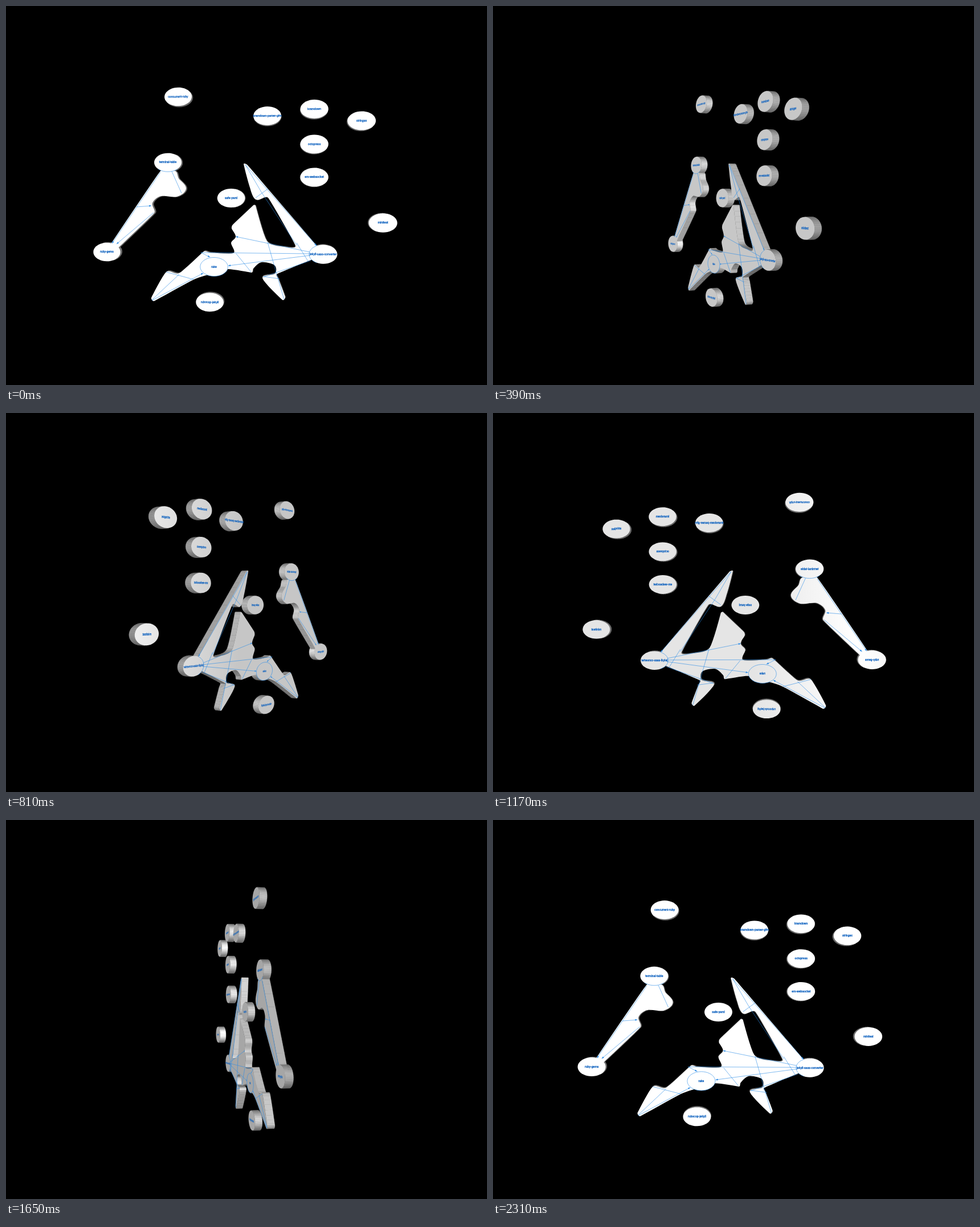
These frames come from a looping animation (844 by 664 pixels, 2.34 s). An HTML page with a canvas:

```html
<!DOCTYPE html>
<html lang="en">
<head>
<meta charset="utf-8">
<title>Rotating dependency graph</title>
<style>
html, body { margin: 0; width: 100%; height: 100%; overflow: hidden; background: #000; }
canvas { display: block; width: 844px; height: 664px; }
</style>
</head>
<body>
<canvas id="stage" width="844" height="664"></canvas>
<script>
const ctx = document.getElementById('stage').getContext('2d');
const LOOP = 2340, STEP = 30;
const CX = 419.2, CY = 345, DIST = 1200;
const FRONT = 7, BACK = -5, RX = 24.3, RY = 16.4;
const TILT = 0.018, ROLL = 0.012;

// node centres in the opening pose
const NODES = {
  'concurrent-ruby': [302, 159], 'kramdown-parser-gfm': [458.5, 192.5],
  'kramdown': [541, 180.5], 'stringex': [624, 201],
  'octopress': [541, 242], 'em-websocket': [541, 300],
  'safe-yaml': [395, 336.5], 'minitest': [661.5, 380],
  'rubocop-jekyll': [357.5, 519], 'terminal-table': [284, 274],
  'ruby-gems': [177, 431], 'jekyll-sass-converter': [556.5, 435],
  'rake': [365, 457]
};

// key points of the two joined plates, clockwise
const PLATES = [
  '271,289 297,289 303,302 316,320 300,334 272,333 257,345 260,363 192,428 182,420',
  '417,277 423,278 466,328 545,420 556,435 505,457 475,470 478,478 490,510 485,515 450,477 ' +
  '472,469 471,454 448,449 434,460 431,467 390,461 365,468 330,479 260,517 255,511 281,466 ' +
  '304,468 347,430 358,432 399,433 395,415 403,404 396,390 398,383 434,349 438,350 458,412 ' +
  '490,422 508,420 460,336 438,339 427,315'
];
// ">" marks links that end in an arrowhead
const LINKS = [
  '271,291>186,416', '291,290 308,328', '229,352>255,350', '259,362>194,417',
  '420,278>545,420', '420,278 448,326 510,419', '438,336 460,320',
  '533,431>403,404', '533,434 342,432', '533,437>390,455', '510,415 530,447',
  '535,446 451,475', '459,414 475,470 488,514', '452,474 480,478', '430,466 404,434',
  '342,432>358,440', '281,466 329,479', '256,515 304,470', '256,516>346,468'
];

let sin, cos;

function turn(ms) {
  const phase = 2 * Math.PI * ms / LOOP;
  const angle = phase + (2.9 + 0.9 * Math.cos(3 * phase)) * Math.PI / 180;
  sin = Math.sin(angle);
  cos = Math.cos(angle);
}

function project([x, y], side) {
  const z = side + TILT * y;
  const k = 1 / (1 - (x * sin + z * cos) / DIST);
  return [CX + (x * cos - z * sin) * k, CY + (y + ROLL * x * sin * sin) * k];
}

// stage point in the opening pose -> point on the plate
function lift([sx, sy]) {
  const x = sx - CX, y = sy - CY;
  const z = FRONT + TILT * y;
  const X = (x * (1 - z * cos / DIST) + z * sin) / (cos + x * sin / DIST);
  return [X, y * (1 - (X * sin + z * cos) / DIST)];
}

const parse = s => s.split(/[ >]/).map(p => lift(p.split(',').map(Number)));
const gap = (a, b) => Math.hypot(b[0] - a[0], b[1] - a[1]);

function oval([x, y]) {
  return Array.from({ length: 40 }, (_, i) => {
    const a = i * Math.PI / 20;
    return [x + RX * Math.cos(a), y + RY * Math.sin(a)];
  });
}

// closed curve through the points; short handles keep long edges straight
function smooth(pts) {
  const at = i => pts[(i + pts.length) % pts.length];
  const handle = (i, dir) => {
    const a = at(i - 1), p = at(i), b = at(i + 1);
    const reach = dir * 0.33 * Math.min(gap(a, p), gap(p, b)) / gap(a, b);
    return [p[0] + (b[0] - a[0]) * reach, p[1] + (b[1] - a[1]) * reach];
  };
  return pts.flatMap((p, i) => {
    const c = handle(i, 1), d = handle(i + 1, -1), q = at(i + 1);
    return Array.from({ length: 8 }, (_, j) => {
      const t = j / 8, u = 1 - t;
      return [0, 1].map(k =>
        u * u * u * p[k] + 3 * u * u * t * c[k] + 3 * u * t * t * d[k] + t * t * t * q[k]);
    });
  });
}

turn(0);
const labels = Object.entries(NODES).map(([text, p]) => ({ text, at: lift(p) }));
const ovals = labels.map(l => oval(l.at));
const solids = PLATES.map(s => smooth(parse(s))).concat(ovals);
const links = LINKS.map(s => ({ pts: parse(s), arrow: s.includes('>') }));
const ring = name => ovals[labels.findIndex(l => l.text === name)];

// side walls with their outward normals
const walls = solids.flatMap(pts => pts.map((a, i) => {
  const b = pts[(i + 1) % pts.length], len = gap(a, b);
  return {
    a, b, nx: (b[1] - a[1]) / len, ny: (a[0] - b[0]) / len,
    mx: (a[0] + b[0]) / 2, my: (a[1] + b[1]) / 2
  };
}));

function trace(pts, z, close) {
  ctx.beginPath();
  pts.forEach(p => ctx.lineTo(...project(p, z)));
  if (close) ctx.closePath();
}

const grey = v => {
  const g = Math.max(0, Math.min(255, Math.round(v)));
  return `rgb(${g},${g},${g})`;
};

function drawWalls() {
  const facing = w => (w.nx * (DIST * sin - w.mx) - w.ny * w.my) / DIST;
  ctx.lineWidth = 0.5;
  walls.filter(w => facing(w) > 0).sort((p, q) => (p.mx - q.mx) * sin).forEach(w => {
    const q = facing(w);
    ctx.fillStyle = ctx.strokeStyle = grey(105 + 115 * q * q + 55 * Math.max(0, -w.ny) * q);
    ctx.beginPath();
    [[w.a, FRONT], [w.b, FRONT], [w.b, BACK], [w.a, BACK]]
      .forEach(([p, z]) => ctx.lineTo(...project(p, z)));
    ctx.closePath();
    ctx.fill();
    ctx.stroke();
  });
}

// diffuse light plus a soft highlight that slides across as the plate turns
function drawFaces(z) {
  const front = z === FRONT;
  const base = front ? 150 + 105 * cos : 148 - 81 * cos;
  const spot = 620 + 500 * (front ? sin : -sin);
  const fill = ctx.createLinearGradient(spot - 180, 0, spot + 180, 0);
  [0, 40, 0].forEach((v, i) => fill.addColorStop(i / 2, grey(base + v)));
  ctx.fillStyle = fill;
  solids.forEach(s => {
    trace(s, z, true);
    ctx.fill();
  });
}

function drawArrow(pts, z) {
  const [a, b] = pts.slice(-2), len = gap(a, b);
  const ux = (b[0] - a[0]) / len, uy = (b[1] - a[1]) / len;
  const wing = s => [b[0] - 4 * ux - 1.5 * s * uy, b[1] - 4 * uy + 1.5 * s * ux];
  trace([b, wing(1), wing(-1)], z, true);
  ctx.fill();
}

function drawLinks(z) {
  ctx.strokeStyle = ctx.fillStyle = '#2b8be6';
  ctx.lineWidth = 0.6;
  const line = (pts, close) => {
    trace(pts, z, close);
    ctx.stroke();
  };
  links.forEach(({ pts, arrow }) => {
    line(pts);
    if (arrow) drawArrow(pts, z);
  });
  line(ring('rake'), true);
  line(ring('terminal-table').slice(5, 16));
  line(ring('jekyll-sass-converter').slice(13, 28));
}

function drawLabels(z) {
  ctx.font = '51px "Liberation Sans", Arial, sans-serif';
  ctx.textAlign = 'center';
  ctx.textBaseline = 'middle';
  ctx.fillStyle = ctx.strokeStyle = '#0a5fbe';
  ctx.lineWidth = 3;
  labels.forEach(({ at: [x, y], text }) => {
    const o = project([x, y], z), r = project([x + 1, y], z), d = project([x, y + 1], z);
    ctx.setTransform((r[0] - o[0]) / 10, (r[1] - o[1]) / 10,
      (d[0] - o[0]) / 10, (d[1] - o[1]) / 10, o[0], o[1]);
    ctx.fillText(text, 0, 0);
    ctx.strokeText(text, 0, 0);
  });
  ctx.setTransform(1, 0, 0, 1, 0, 0);
}

function draw(ms) {
  turn(ms);
  ctx.fillStyle = '#000';
  ctx.fillRect(0, 0, 844, 664);
  drawWalls();
  const eye = DIST * cos;
  if (eye <= FRONT && eye >= BACK) return;
  const z = eye > FRONT ? FRONT : BACK;
  drawFaces(z);
  drawLinks(z);
  drawLabels(z);
}

const start = performance.now();
function tick() {
  const ms = Math.max(0, performance.now() - start) % LOOP;
  draw(Math.floor(ms / STEP) * STEP);
  requestAnimationFrame(tick);
}
tick();
</script>
</body>
</html>
```
